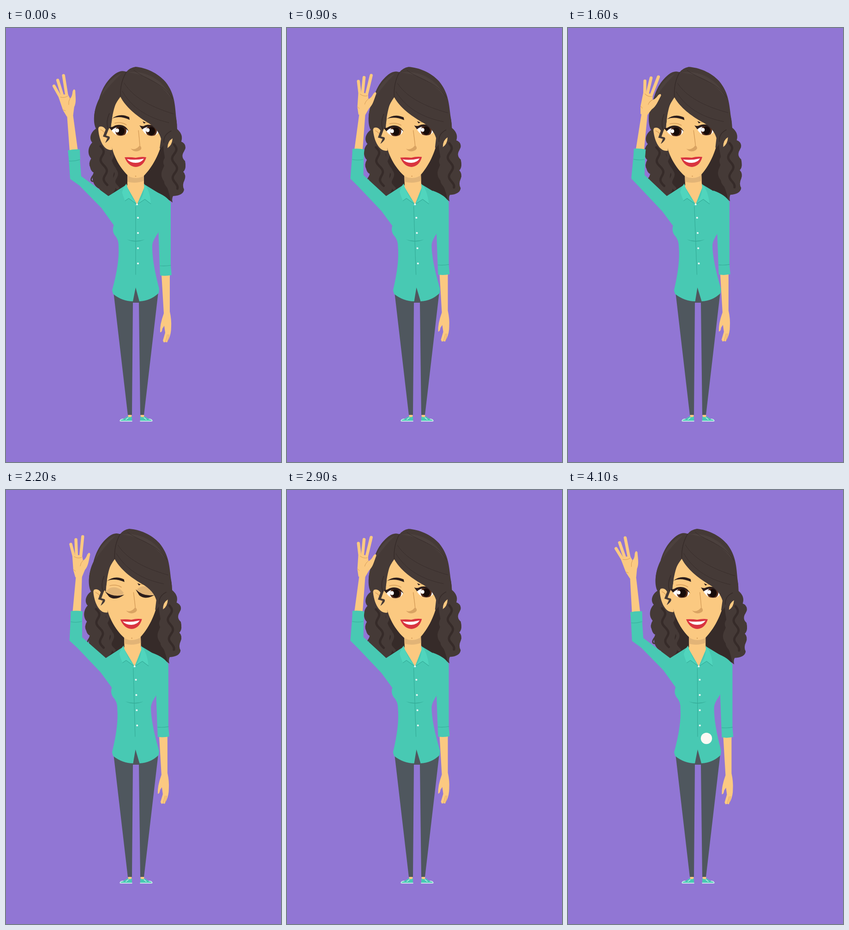
An HTML page with a canvas that plays this animation: 596 by 940 pixels, repeating every 4200 ms.

```html
<!DOCTYPE html>
<html lang="en">
<head>
<meta charset="utf-8">
<title>Waving woman</title>
<style>
html, body { margin: 0; width: 596px; height: 940px; overflow: hidden; background: #9176d4; }
canvas { display: block; }
</style>
</head>
<body>
<canvas id="stage" width="596" height="940"></canvas>
<script>
const ctx = document.getElementById('stage').getContext('2d');
const LOOP = 4200, STEP = 100, WAVE = 2000 / 3;
const C = {
  back: '#9176d4', skin: '#fbc981', shade: '#e2b477', line: '#d59c58',
  shirt: '#48c9b3', collar: '#50d5bd', seam: '#35ad99',
  pants: '#4f575e', hair: '#453a37', dark: '#362b29', light: '#4c413e', ink: '#2b1d1b',
  lips: '#d9343f', iris: '#552b18', pupil: '#160b09'
};

const lerp = (a, b, k) => a + (b - a) * k;
const clamp = v => Math.max(0, Math.min(1, v));
const rad = deg => deg * Math.PI / 180;

function fill(d, color) {
  ctx.fillStyle = color;
  ctx.fill(new Path2D(d));
}
function stroke(d, color, width) {
  ctx.strokeStyle = color;
  ctx.lineWidth = width;
  ctx.stroke(new Path2D(d));
}
function oval(x, y, rx, ry, color) {
  ctx.fillStyle = color;
  ctx.beginPath();
  ctx.ellipse(x, y, rx, ry, 0, 0, 7);
  ctx.fill();
}
function group(transform, draw) {
  ctx.save();
  transform();
  draw();
  ctx.restore();
}

// Wavy lock from (x, y), running down with a sideways drift
function lock(x, y, drift, length, color, width, swing = 5) {
  let d = '';
  for (let i = 0; i <= length; i += 3) {
    const px = x + drift * i / length + swing * Math.sin(i / 6.6);
    d += (i ? 'L' : 'M') + px + ' ' + (y + i);
  }
  stroke(d, color, width);
}

function backHair() {
  fill('M205 150C189 175 188 205 195 218C184 225 179 239 187 248C177 258 176 274 185 283C179 297 183 310 190 313C184 326 190 343 202 348Q209 362 224 366L350 370L361 378Q359 370 362 364Q384 363 386 350Q381 341 387 329Q391 319 384 311Q391 300 388 288Q378 279 386 267Q391 255 379 248Q386 232 371 219Q370 180 350 150Z', C.hair);
  fill('M226 245L342 245C338 270 351 285 340 305Q332 320 344 334Q352 348 357 374L330 366L224 365Q243 350 236 334Q227 320 239 305Q221 282 226 245Z', C.dark);
  lock(205, 256, 14, 86, C.dark, 5);
  lock(223, 262, 18, 84, C.hair, 7);
  lock(349, 260, 4, 92, C.hair, 9);
  lock(364, 252, 3, 96, C.dark, 5);
  stroke('M193 253C180 262 186 274 194 273M186 283C176 299 188 310 196 304M190 318C180 330 186 334 191 331', C.hair, 3);
  stroke('M378 247C391 252 390 266 379 268M380 284C392 294 388 310 380 312M382 318C391 325 384 332 378 329', C.hair, 3);
}

function legs() {
  fill('M233 572L264 838H273L275 595H288L291 838H299L330 572Z', C.pants);
  fill('M272 560H292V595H272Z', C.pants);
  for (const side of [-1, 1]) {
    group(() => { ctx.translate(282, 0); ctx.scale(side, 1); }, () => {
      fill('M10 838H17L18 845H9Z', C.skin);
      fill('M9 841Q14 845 19 841Q25 847 34 848L35 852H9Z', C.shirt);
      stroke('M9 851.5H34', '#e9fbf8', 1.6);
      stroke('M28 847Q34 847 35 851M17 844L22 848', '#d5f3ee', 1.3);
    });
  }
}

function torso() {
  fill('M263 305V340L257 348L284 383L306 348L299 340V305Z', C.skin);
  fill('M263 318H299V331Q281 338 263 333Z', C.shade);
  fill('M260 340L222 364L205 386L234 426Q229 438 235 448Q245 458 244 475Q246 510 230 568L232 576Q252 592 275 592L281 562L289 592Q313 591 331 574L332 565Q316 505 317 470Q318 460 329 445L340 420L338 362L302 340L284 382Z', C.shirt);
  stroke('M281 386V534', C.seam, 1.2);
  fill('M262 458Q281 464 301 458Q281 467 262 458Z', C.seam);
  fill('M261 337Q249 351 248 381L266 369L284 382Q266 361 261 337Z', C.collar);
  fill('M299 337Q312 350 314 381L301 371L284 382Q302 362 299 337Z', C.collar);
  stroke('M248 381L266 369L284 382L301 371L314 381', C.seam, 1);
  for (const [x, y] of [[284, 382], [286, 411], [286, 444], [286, 477], [286, 510]])
    oval(x, y, 2.1, 2.1, '#e9f8f5');
}

function loweredArm() {
  fill('M337 534H355L355 614Q359 632 358 648Q358 662 353 673L349 681L346 680L342 681L340 677L345 660L343 645L339 651Q338 660 334 659Q333 643 342 618Z', C.skin);
  stroke('M346 679L350 664M350 679L353 664', C.line, .8);
  fill('M322 354Q350 364 357 379L357 515L359 535Q347 538 334 536L333 515L329 405Z', C.shirt);
  stroke('M327 405L329.5 438M334 515Q346 516 357 514', C.seam, 1.1);
}

function eye(x, y, tilt, shut) {
  group(() => { ctx.translate(x, y); ctx.rotate(tilt); }, () => {
    const almond = 'M-19 -3C-11 -15 9 -15 18 -1C15 13 -10 16 -19 -3Z';
    fill(almond, '#fff');
    group(() => ctx.clip(new Path2D(almond)), () => {
      oval(2, 0, 12, 12, C.iris);
      oval(2, 0, 8.5, 9, C.pupil);
      oval(-6, -1, 4, 4.2, '#fff');
      if (shut) {
        ctx.fillStyle = C.shade;
        ctx.fillRect(-22, -16, 44, 25 * shut);
      }
    });
    if (shut > .5) {
      fill('M-20 -3C-13 -17 9 -17 19 0Q0 12 -20 -3Z', C.shade);
      fill('M-22 -5Q-3 10 20 3Q1 17 -13 7Z', C.ink);
    } else {
      fill('M-25 -9Q-18 -7 -14 -10C-4 -16 13 -14 19 1C8 -11 -8 -12 -18 -1Z', C.ink);
    }
    stroke('M-11 -17Q4 -20 14 -13', C.line, 1.5);
  });
}

function face(shut) {
  fill('M229 220Q205 199 200 218C201 240 211 267 230 264Z', C.skin);
  stroke('M205 220Q215 224 218 239', C.line, 1.3);
  fill('M361 239Q350 245 350 260Q360 254 361 239Z', C.skin);
  fill('M247 142C233 170 226 200 227 245C231 278 250 307 266 321Q281 329 298 321C317 302 334 272 341 235C332 204 291 191 247 142Z', C.skin);

  eye(247, 223, 0, shut);
  eye(313, 223, .12, shut);
  fill('M230 196Q247 183 267 193L268 199Q246 189 230 196Z', C.ink);
  fill('M296 202L303 205L299 207Z', C.ink);

  stroke('M287 222Q289 240 290 254', C.line, 1.4);
  fill('M270 261Q281 266 290 254Q297 261 290 265Q279 271 270 261Z', '#d9a362');

  fill('M257 280Q269 279 281 281Q293 278 304 280Q298 300 281 301Q265 300 257 280Z', C.lips);
  fill('M262 284Q281 287 299 283Q293 292 281 292Q269 292 262 284Z', '#fff');
  oval(281, 321, 1.2, 1.2, C.line);
}

function frontHair() {
  fill('M248 149C260 172 283 190 304 203C324 214 333 228 336 240L333 261Q339 260 345 247L361 236Q374 225 369 196C366 166 366 143 346 117C329 97 303 86 281 84Q268 86 261 95Q250 90 237 99C217 114 208 133 202 153C190 176 188 202 196 217Q209 208 216 220L210 235L220 238L215 249Q228 240 224 235L217 233L223 218Q229 210 230 194C232 172 239 161 248 149Z', C.hair);
  fill('M264 96C300 90 344 113 357 151C333 118 304 101 264 96Z', C.light);
  stroke('M261 95Q247 118 248 148', C.dark, 1.4);
  stroke('M277 91C300 111 339 116 361 153M256 119C278 156 330 176 363 186M252 137C276 178 314 196 353 205', C.dark, .8);
  fill('M251 98C230 105 212 127 206 149C220 129 238 110 251 98Z', C.light);
  stroke('M224 185Q216 203 221 218M358 223Q341 231 342 248', C.dark, 1.5);
}

function raisedArm(k, handAngle) {
  const at = (x0, y0, x1, y1) => [lerp(x0, x1, k), lerp(y0, y1, k)];
  const cuff = at(147, 264, 156, 262);
  const wrist = at(138, 186, 167, 184);

  ctx.fillStyle = C.skin;
  ctx.beginPath();
  ctx.moveTo(cuff[0] - 9, cuff[1] + 4);
  ctx.lineTo(wrist[0] - 6, wrist[1]);
  ctx.lineTo(wrist[0] + 7, wrist[1]);
  ctx.lineTo(cuff[0] + 9, cuff[1] + 4);
  ctx.fill();

  group(() => { ctx.translate(...wrist); ctx.rotate(rad(handAngle)); }, () => {
    fill('M-7 5L-13 -10L-18 -39Q-8 -46 3 -42L6 -33Q11 -35 14 -47Q18 -54 20 -48C18 -34 19 -23 12 -13L7 4Z', C.skin);
    stroke('M-14 -38L-24 -65', C.skin, 6.5);
    stroke('M-9 -40L-14 -76', C.skin, 6.5);
    stroke('M0 -39L0 -84', C.skin, 6.5);
    stroke('M-14 -39Q-5 -35 2 -39M6 -33Q1 -27 1 -20M-13 -11L-8 -8', C.line, .9);
  });

  const points = [
    at(135, 270, 143, 269), at(139, 327, 137, 326), at(159, 341, 153, 343),
    at(207, 390, 204, 397), at(235, 429, 227, 428), at(270, 410, 263, 410),
    at(250, 352, 242, 353), at(222, 364, 216, 366), at(163, 321, 166, 318),
    at(159, 270, 168, 269)
  ];
  ctx.fillStyle = C.shirt;
  ctx.beginPath();
  points.forEach(p => ctx.lineTo(...p));
  ctx.fill();
  group(() => { ctx.translate(...cuff); ctx.rotate(rad(lerp(-5, 4, k))); }, () => {
    fill('M-13 0Q0 -2 13 0L12 23Q0 26 -12 23Z', C.shirt);
    stroke('M-12 23Q0 25 11 22', C.seam, 1);
  });
}

// Body swing, 0 to 1 and back, eased at both ends
function swing(t) {
  const p = ((t - 10 + WAVE) % WAVE) / WAVE * 2;
  const q = p < 1 ? p : 2 - p;
  return q < .5 ? 4 * q ** 3 : 1 - 4 * (1 - q) ** 3;
}

function draw(t) {
  const k = swing(t);
  const hand = (1 - Math.cos((t - 60) / WAVE * 2 * Math.PI)) / 2;
  const shut = clamp(1.5 - Math.abs(t - 2220) / 100);
  const headPose = () => {
    ctx.translate(282 - 11.5 * k, 340);
    ctx.rotate(-.035 * k);
    ctx.translate(-282, -340);
  };

  ctx.fillStyle = C.back;
  ctx.fillRect(0, 0, 596, 940);
  ctx.lineCap = ctx.lineJoin = 'round';

  group(headPose, backHair);
  legs();
  group(() => ctx.translate(-7.5 * k, -2 * k), loweredArm);
  group(() => ctx.transform(1, 0, .04 * k, 1, -23 * k, 0), torso);
  group(headPose, () => { face(shut); frontHair(); });
  raisedArm(k, -13 + 50 * hand);

  // Touch marker at the very end of the loop
  if (t >= 4100) oval(300, 538, 12.2, 12.2, '#fbf9f4');
}

function tick(now) {
  draw(Math.floor(now % LOOP / STEP) * STEP);
  requestAnimationFrame(tick);
}
draw(0);
requestAnimationFrame(tick);
</script>
</body>
</html>
```
